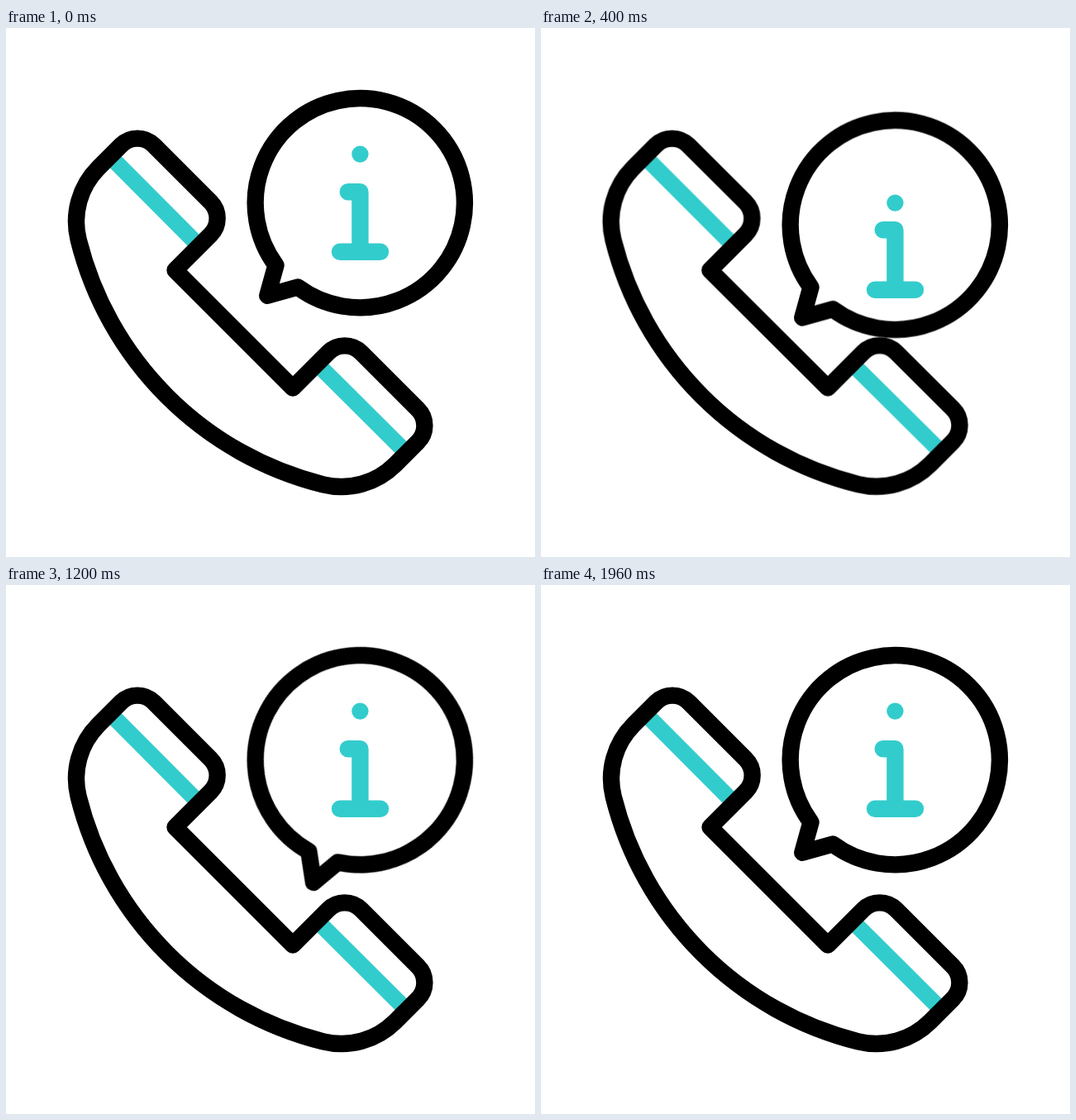
These frames come from a looping animation (640x640 px, 2000 ms). An HTML page without scripts:

```html
<!DOCTYPE html>
<html lang="en">
<head>
<meta charset="utf-8">
<title>Phone information</title>
<style>
  html, body { margin: 0; width: 100%; height: 100%; overflow: hidden; background: #fff; }
  svg { display: block; width: 100vw; height: 100vh; }

  .line, .teal {
    fill: none;
    stroke: #000;
    stroke-width: 20.4;
    stroke-linejoin: round;
    stroke-linecap: round;
  }
  .teal { stroke: #3cc; }
  .band { stroke-linecap: butt; stroke-width: 19.6; }

  .phone, .drop, .tail {
    animation: 2s cubic-bezier(.333, 0, .667, 1) infinite;
  }
  .phone { transform-origin: 231px 409px; animation-name: ring; }
  .drop { animation-name: drop; }
  .tail {
    transform-origin: 428.4px 211.7px;
    animation-name: sway;
    animation-timing-function: cubic-bezier(.333, 0, .333, 1);
  }

  .bubble { --fall: 26.6px; }
  .stem { --fall: 46px; }
  .dot { --fall: 59px; }

  @keyframes ring {
    0%, 4.73%, 32.01%, 100% { transform: rotate(0deg); }
    8.14%, 14.96%, 21.78%, 28.6% { transform: rotate(4.6deg); }
    11.55%, 18.37%, 25.19% { transform: rotate(-4.6deg); }
  }
  @keyframes drop {
    0%, 4.8%, 28.9%, 100% { transform: translateY(0); }
    13.5%, 20% { transform: translateY(var(--fall)); }
  }
  @keyframes sway {
    0%, 36.3%, 98%, 100% { transform: rotate(0deg); }
    49.3%, 58.3% { transform: rotate(-28deg); }
    70%, 80.3% { transform: rotate(19deg); }
  }
</style>
</head>
<body>
<svg viewBox="0 0 640 640">
  <g class="phone">
    <path class="teal band" d="M126 155.5 234 264M376 406 484.5 514"/>
    <path class="line" d="M139 142A28 28 0 0 1 179 142L247.5 210.5A28 28 0 0 1 247.5 250
      L204.5 293 347 435.5 390 392.5A28 28 0 0 1 429.5 392.5L498 461A28 28 0 0 1 498 501
      L471 528A92 92 0 0 1 383.7 552.3A406 406 0 0 1 87.7 256.3A92 92 0 0 1 112 169Z"/>
  </g>
  <g class="drop bubble">
    <path class="line tail" d="M353 313.5A126.6 126.6 0 1 0 326.5 287L316.3 323.8Z"/>
  </g>
  <path class="teal drop stem" d="M413.7 198.2H428.4V270.8M404 270.8H453"/>
  <circle class="drop dot" cx="428.4" cy="152.6" r="10.2" fill="#3cc"/>
</svg>
</body>
</html>
```
